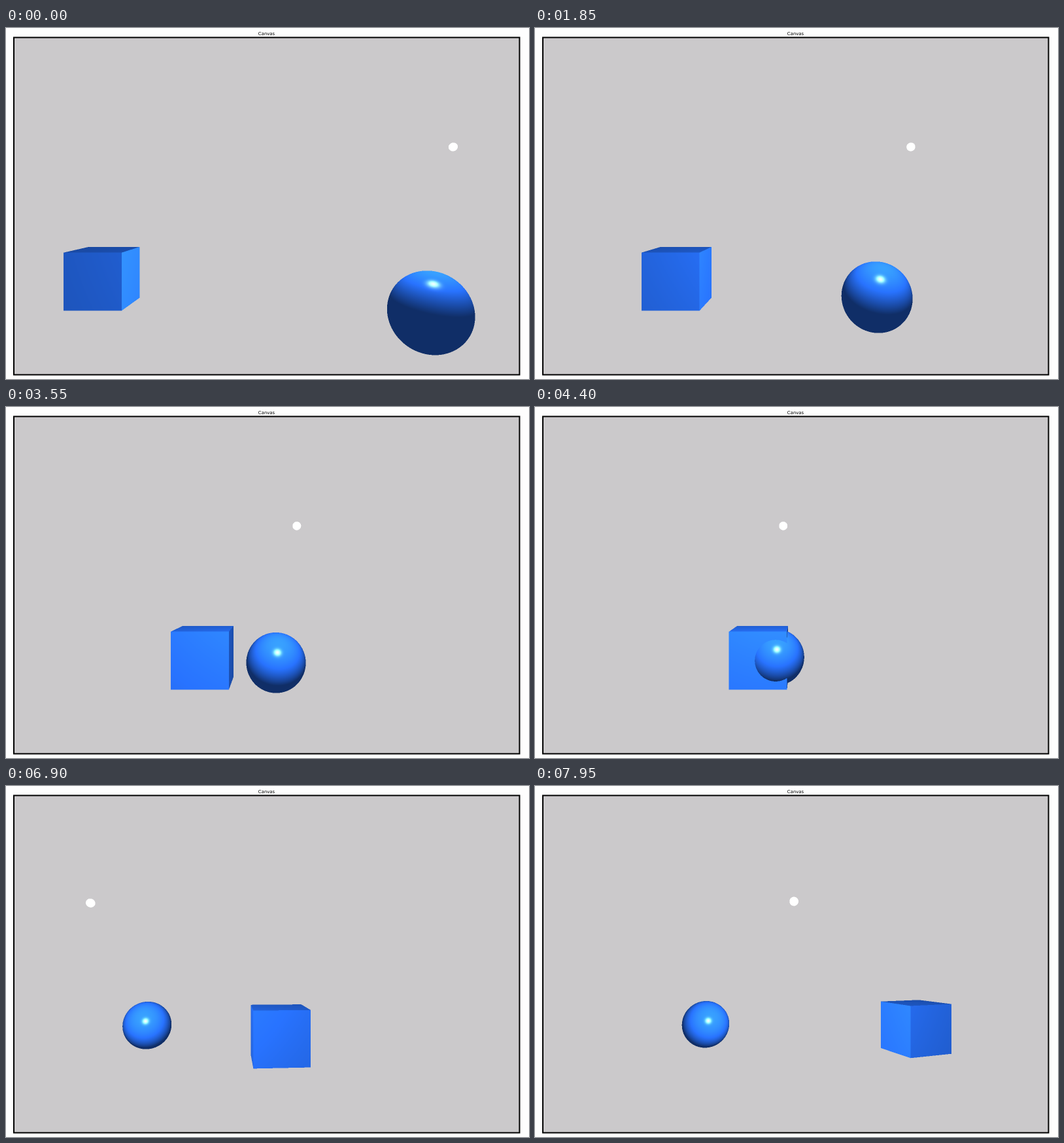
Animation, 800 px wide and 537 px high, one loop 8 s. Source, as an HTML page with a canvas:

```html
<!DOCTYPE html>
<html lang="en">
<head>
<meta charset="utf-8">
<title>Canvas</title>
<style>
  html, body { margin: 0; width: 100%; height: 100%; overflow: hidden; background: #fefefe; }
  canvas { position: absolute; left: 0; top: 0; display: block; }
  h1 {
    position: absolute; left: 0; top: 5px; width: 797px; margin: 0;
    font: 6.9px/9px "DejaVu Sans", sans-serif; text-align: center; color: #000;
  }
</style>
</head>
<body>
<canvas id="stage" width="800" height="537"></canvas>
<h1>Canvas</h1>
<script>
const ctx = document.getElementById('stage').getContext('2d');
const LOOP = 8000, STEP = 50;
const FOCAL = 621.7, MID_X = 399, MID_Y = 272.6;
const BACKDROP = [203, 201, 203];
const BLUE = [0.157, 0.45, 1];
const AMBIENT = 0.405, SPECULAR = 0.75, SHININESS = 32;

// Tables of [seconds, value]; x points right, y up, z away from the viewer.
const TRAVEL = [[0.426, 0], [5.7, 3.117], [6.9, 3.835], [7.95, 4.485]];
const YAW = [[6.55, 0], [6.8, 0.068], [6.9, 0.081], [7.15, 0.103], [7.4, 0.17], [7.65, 0.28], [7.95, 0.381]];
const CAMERA_X = [[6.9, 0], [7.65, -3.95]];
const CAMERA_Z = [[6.9, 0], [7.15, 0.117], [7.4, 0.292], [7.65, 0.587]];
const POINTER_X = [[5.2, 83], [5.6, 154]];
const POINTER_Y = [[5.2, 290], [5.6, 273]];
const POINTER_SHOWN = [5.2, 6.5];

function valueAt(keys, t) {
  if (t <= keys[0][0]) return keys[0][1];
  for (let i = 1; i < keys.length; i++) {
    const [t0, v0] = keys[i - 1], [t1, v1] = keys[i];
    if (t <= t1) return v0 + (v1 - v0) * (t - t0) / (t1 - t0);
  }
  return keys[keys.length - 1][1];
}

const dot = (a, b) => a[0] * b[0] + a[1] * b[1] + a[2] * b[2];
const sub = (a, b) => [a[0] - b[0], a[1] - b[1], a[2] - b[2]];
const along = (origin, dir, d) => origin.map((v, i) => v + dir[i] * d);
function unit(a) {
  const k = 1 / Math.sqrt(dot(a, a));
  return [a[0] * k, a[1] * k, a[2] * k];
}

function hitBall(ball, origin, dir) {
  const rel = sub(origin, ball.center);
  const a = dot(dir, dir), b = dot(rel, dir);
  const disc = b * b - a * (dot(rel, rel) - ball.r * ball.r);
  if (disc < 0) return null;
  const d = (-b - Math.sqrt(disc)) / a;
  return d > 0 ? { d, normal: () => unit(sub(along(origin, dir, d), ball.center)) } : null;
}

function hitCube(cube, origin, dir) {
  let near = -Infinity, far = Infinity, axis = 0;
  for (let i = 0; i < 3; i++) {
    const slope = dir[i] || 1e-9;
    const mid = (cube.center[i] - origin[i]) / slope;
    const half = cube.r / Math.abs(slope);
    if (mid - half > near) { near = mid - half; axis = i; }
    far = Math.min(far, mid + half);
  }
  if (near > far || near < 0) return null;
  const normal = [0, 0, 0];
  normal[axis] = dir[axis] > 0 ? -1 : 1;
  return { d: near, normal: () => normal };
}

function makeScene(t) {
  const move = valueAt(TRAVEL, t), yaw = valueAt(YAW, t);
  const lamp = { center: [2.2 - move, 0.7, 4.8], r: 0.05, hit: hitBall, glow: true };
  const ball = { center: [2 - move, -1.3, 5 + move], r: 0.5, hit: hitBall };
  const cube = { center: [move - 3, -1.3, 7.5], r: 0.5, hit: hitCube };
  return {
    lamp, solids: [lamp, ball, cube],
    eye: [valueAt(CAMERA_X, t), 0, valueAt(CAMERA_Z, t)],
    cos: Math.cos(yaw), sin: Math.sin(yaw)
  };
}

// Phong lighting from the lamp, without shadows.
function shade(scene, point, n) {
  const toLamp = unit(sub(scene.lamp.center, point));
  const toEye = unit(sub(scene.eye, point));
  const facing = dot(n, toLamp);
  const mirrored = 2 * facing * dot(n, toEye) - dot(toLamp, toEye);
  const shine = facing > 0 ? SPECULAR * Math.max(0, mirrored) ** SHININESS : 0;
  const lit = AMBIENT + Math.max(0, facing);
  return BLUE.map(c => 255 * Math.min(1, c * lit + shine));
}

function trace(scene, px, py) {
  const { eye, cos, sin } = scene;
  const u = (px - MID_X) / FOCAL;
  const dir = [u * cos + sin, (MID_Y - py) / FOCAL, cos - u * sin];
  let best = null, solid = null;
  for (const s of scene.solids) {
    const hit = s.hit(s, eye, dir);
    if (hit && (!best || hit.d < best.d)) { best = hit; solid = s; }
  }
  if (!best) return BACKDROP;
  if (solid.glow) return [255, 255, 255];
  return shade(scene, along(eye, dir, best.d), best.normal());
}

function screenBox(scene, { center, r }) {
  const xs = [], ys = [];
  for (let i = 0; i < 8; i++) {
    const corner = center.map((v, axis) => v + (i >> axis & 1 ? r : -r));
    const [x, y, z] = sub(corner, scene.eye);
    const depth = x * scene.sin + z * scene.cos;
    xs.push(MID_X + FOCAL * (x * scene.cos - z * scene.sin) / depth);
    ys.push(MID_Y - FOCAL * y / depth);
  }
  const left = Math.max(14, Math.floor(Math.min(...xs)) - 1);
  const top = Math.max(17, Math.floor(Math.min(...ys)) - 1);
  return {
    left, top,
    width: Math.min(784, Math.ceil(Math.max(...xs)) + 1) - left,
    height: Math.min(529, Math.ceil(Math.max(...ys)) + 1) - top
  };
}

function renderSolid(scene, solid) {
  const { left, top, width, height } = screenBox(scene, solid);
  if (width < 1 || height < 1) return;
  const image = ctx.createImageData(width, height);
  for (let y = 0, at = 0; y < height; y++) {
    for (let x = 0; x < width; x++, at += 4) {
      const sum = [0, 0, 0];
      for (let k = 0; k < 4; k++) {
        const c = trace(scene, left + x + 0.25 + (k & 1) / 2, top + y + 0.25 + (k >> 1) / 2);
        for (let i = 0; i < 3; i++) sum[i] += c[i];
      }
      for (let i = 0; i < 3; i++) image.data[at + i] = sum[i] / 4;
      image.data[at + 3] = 255;
    }
  }
  ctx.putImageData(image, left, top);
}

const arrow = new Path2D('M.5 .5V12L3.1 9.6L4.9 13.7L6.7 12.9L4.9 8.9H8.2Z');

function drawPointer(t) {
  if (t < POINTER_SHOWN[0] || t >= POINTER_SHOWN[1]) return;
  ctx.save();
  ctx.translate(valueAt(POINTER_X, t), valueAt(POINTER_Y, t));
  ctx.fillStyle = '#fff';
  ctx.strokeStyle = '#222';
  ctx.lineWidth = 0.9;
  ctx.fill(arrow);
  ctx.stroke(arrow);
  ctx.restore();
}

function draw(t) {
  ctx.clearRect(0, 0, 800, 537);
  ctx.fillStyle = '#000';
  ctx.fillRect(11, 13.5, 775.5, 518);
  ctx.fillStyle = `rgb(${BACKDROP})`;
  ctx.fillRect(13, 15.5, 771.5, 514);
  const scene = makeScene(t);
  scene.solids.forEach(solid => renderSolid(scene, solid));
  drawPointer(t);
}

const start = performance.now();
let shown = -1;
function tick() {
  const elapsed = Math.max(0, performance.now() - start) % LOOP;
  const step = Math.floor(elapsed / STEP);
  if (step !== shown) {
    shown = step;
    draw(step * STEP / 1000);
  }
  requestAnimationFrame(tick);
}
tick();
</script>
</body>
</html>
```
